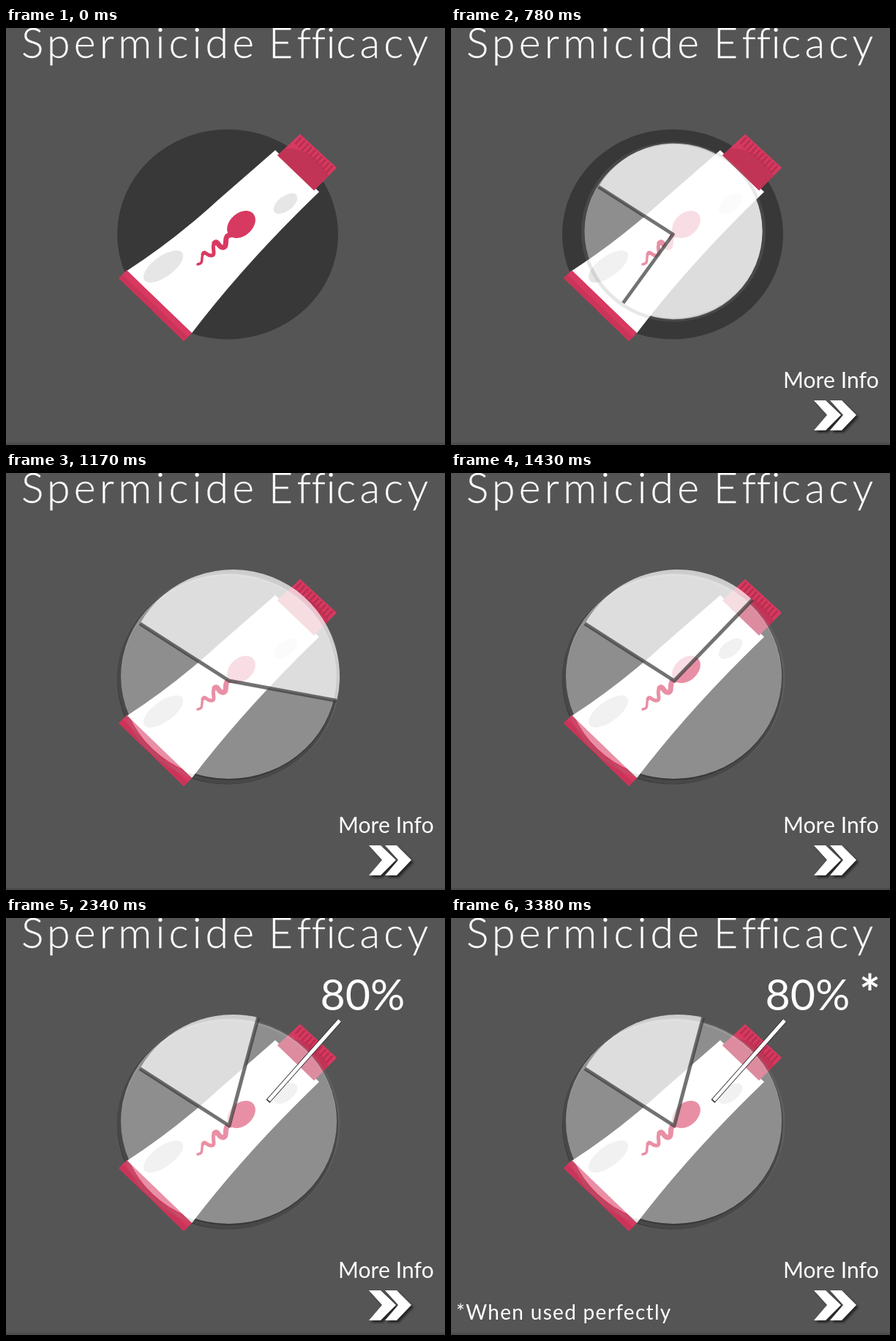
Animation, 600 px wide and 570 px high, one loop 7020 ms. Source, as an HTML page:

```html
<!DOCTYPE html>
<html lang="en">
<head>
<meta charset="utf-8">
<title>Spermicide Efficacy</title>
<style>
  html, body { margin: 0; width: 100%; height: 100%; overflow: hidden; background: #555; }
  svg { display: block; width: 600px; height: 570px; }
  text { font-family: Lato, "Open Sans", sans-serif; fill: #fff; }
  #arrows { filter: drop-shadow(3px 3px 1.5px rgba(0, 0, 0, .55)); }
</style>
</head>
<body>
<svg viewBox="0 0 600 570">
  <rect width="600" height="570" fill="#555"/>
  <rect y="567" width="600" height="3" fill="#4c4c4c"/>
  <text y="41" font-size="57" font-weight="300" letter-spacing="5.300" stroke="#fff" stroke-width=".3"><tspan x="21">Spermicide</tspan><tspan x="359">E</tspan><tspan letter-spacing=".8">ffi</tspan><tspan>cacy</tspan></text>
  <ellipse cx="303" cy="282" rx="151" ry="143.5" fill="#383838"/>

  <!-- tube -->
  <path d="M368 167L290 235Q230 290 165 332L254 417Q328 320 428 224Z" fill="#fff"/>
  <path d="M371 174L402 145L452 191L421 222Z" fill="#d83960"/>
  <path d="M371 174L381 164.500Q420 163 441 202L421 222Z" fill="#c23456"/>
  <path d="M398.500 153L444.500 195.500" stroke="#b92f50" stroke-width="13" stroke-dasharray="3 3.400" fill="none"/>
  <path d="M165 331L254 417L243 428L154 342Z" fill="#d83960"/>
  <path d="M159 337L248.500 422.500L243 428L154 342Z" fill="#cb3459"/>
  <g fill="#e6e6e6">
    <ellipse rx="32" ry="14" transform="translate(215 326) rotate(-36)"/>
    <ellipse rx="19" ry="10" transform="translate(382 240) rotate(-38)"/>
  </g>
  <ellipse rx="22" ry="15.500" transform="translate(321.500 268.500) rotate(-42)" fill="#d83960"/>
  <g fill="none" stroke="#d83960" stroke-linecap="round">
    <path d="M307 283C296 283 304 299 297 300S290 289 285 294" stroke-width="7"/>
    <path d="M285 294C280 299 288 310 281 311S272 303 269 309" stroke-width="5"/>
    <path d="M269 309C266 315 271 322 262 323" stroke-width="3.500"/>
  </g>

  <g id="pie">
    <ellipse id="ring" fill="none" stroke="#888" stroke-width="5"/>
    <ellipse id="base" fill="#fff" fill-opacity=".43"/>
    <path id="light" fill="#fff" fill-opacity=".7"/>
    <path id="edges" fill="none" stroke="#3c3c3c" stroke-opacity=".72" stroke-linejoin="round"/>
  </g>

  <g id="pointer">
    <path id="outline" stroke="#222"/>
    <path id="core" stroke="#fff"/>
  </g>
  <text id="percent" x="429.500" y="126" font-size="59">80%</text>
  <text id="star" x="558" y="128" font-size="68" font-weight="700">*</text>
  <text id="note" x="7" y="549" font-size="28" letter-spacing="1.300">*When used perfectly</text>

  <text id="more" font-size="30" letter-spacing=".1" x="-2" y="0">More Info</text>
  <g id="arrows" fill="#fff">
    <path d="M-29 -20.500H-13L8 -.5L-13 20.500H-29L-11 -.5Z"/>
    <path d="M-7 -20.500H9L29 -.5L9 20.500H-7L11 -.5Z"/>
  </g>
</svg>
<script>
const STEP = 130, LOOP = 7020;
const $ = id => document.getElementById(id);
const set = (id, attrs) => {
  for (const name in attrs) $(id).setAttribute(name, attrs[name]);
};
const show = (id, on) => set(id, { opacity: +on });
const at = (list, k) => list[Math.min(k, list.length - 1)];
const mix = (a, b, p) => a + (b - a) * p;

// one value per step, the last one holds
const RADIUS = [0, 0, 10, 26, 45, 84, 121.5, 140, 147.5];
const END = [572, 572, 572, 562, 545, 520, 486, 449, 410, 370.5, 341, 314, 293, 285];
const RING = [.9, .9, .9, .9, .9, .5, .2];
const POP = [0, .3, .6, .85, .955, 1.04, 1];
const START = 212.6;

// where a ray from the apex meets the circle
function rim(apex, center, r, degrees) {
  const a = degrees * Math.PI / 180, dx = Math.cos(a), dy = Math.sin(a);
  const vx = apex[0] - center[0], vy = apex[1] - center[1];
  const dot = vx * dx + vy * dy;
  const t = -dot + Math.sqrt(dot * dot - vx * vx - vy * vy + r * r);
  return [apex[0] + t * dx, apex[1] + t * dy];
}

function drawPie(k) {
  const r = at(RADIUS, k);
  show('pie', r > 0);
  if (!r) return;
  const s = r / 147.5, late = s ** 8, ry = r * (1 - .051 * s ** 4);
  const cx = 302 + 2.5 * s, cy = 278;
  set('base', { cx, cy, rx: r, ry });
  set('ring', { cx, cy: cy + 2.5 * late, rx: r + 2, ry: ry + 2,
    'stroke-opacity': at(RING, k) });

  const center = [cx + 5.5 * late, cy], R = r * .99;
  const apex = [300 + 5 * s * s, 278 + 6 * s * s], end = at(END, k);
  const from = rim(apex, center, R, START), to = rim(apex, center, R, end);
  const large = +(end - START > 180);
  set('light', { d: `M${apex}L${from}A${R} ${R} 0 ${large} 1 ${to}Z` });
  set('edges', { d: `M${from}L${apex}L${to}`, 'stroke-width': 3.5 + 1.5 * s });
}

function drawPointer(k) {
  show('pointer', k >= 15);
  const p = Math.max(0, Math.min(1, (k - 15) / 2));
  const x1 = mix(365, 358, p), y1 = mix(234, 250.5, p);
  const x2 = mix(413, 456, p), y2 = mix(180, 140, p);
  set('outline', { d: `M${x1} ${y1}L${x2} ${y2}`, 'stroke-width': mix(4, 6.5, p) });
  set('core', { d: `M${x1 + 1} ${y1 - 1.1}L${x2} ${y2}`, 'stroke-width': mix(2.6, 5, p) });
}

function frame(now) {
  const k = Math.floor(now % LOOP / STEP), pop = at(POP, k);
  drawPie(k);
  drawPointer(k);
  set('more', { transform: `translate(456 492) scale(${pop})` });
  set('arrows', { transform: `translate(525 529.5) scale(${pop})` });
  set('percent', { opacity: k < 17 ? 0 : k < 18 ? .5 : 1 });
  show('star', k >= 22);
  show('note', k >= 26);
}

const begin = performance.now();
function tick() {
  frame(performance.now() - begin);
  requestAnimationFrame(tick);
}
tick();
</script>
</body>
</html>
```
